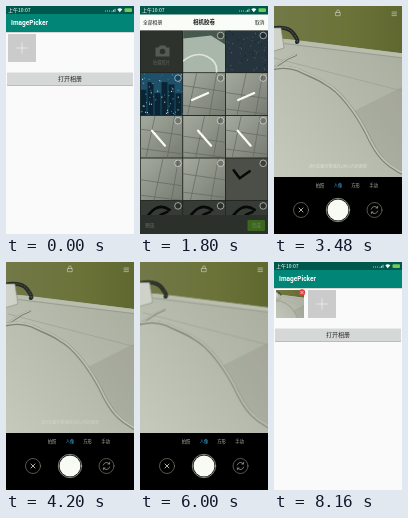
These frames come from a looping animation (128x228 px, 8280 ms). An HTML page:

```html
<!DOCTYPE html>
<html lang="zh">
<head>
<meta charset="utf-8">
<title>ImagePicker</title>
<style>
html, body { margin: 0; width: 100%; height: 100%; overflow: hidden; background: #000; }
#stage { display: block; width: 100vw; height: 100vh; }
text { font-family: "Noto Sans CJK SC", "Noto Sans CJK JP", "Noto Sans CJK", sans-serif; }
.latin { font-family: Roboto, Inter, sans-serif; }
.mid { text-anchor: middle; }
.line { fill: none; stroke-linecap: round; stroke-linejoin: round; }
#shutter { transform-box: fill-box; transform-origin: center; }
</style>
</head>
<body>
<svg id="stage" viewBox="0 0 128 228">
  <defs>
    <linearGradient id="wall" x2="1" y2="0">
      <stop stop-color="#747a4b"/><stop offset=".55" stop-color="#6b7339"/><stop offset="1" stop-color="#5a632c"/>
    </linearGradient>
    <linearGradient id="desk" x1="1" y1="0" x2="0" y2="1">
      <stop stop-color="#a3a798"/><stop offset=".5" stop-color="#b6baac"/><stop offset="1" stop-color="#cbd0c2"/>
    </linearGradient>
    <linearGradient id="tile" x2="1" y2="1">
      <stop stop-color="#a5aa9f"/><stop offset="1" stop-color="#777c72"/>
    </linearGradient>

    <rect id="charge" x="118.5" y="2.3" width="7.5" height="3.8" rx="1" fill="#72c85a"/>
    <g id="status" fill="#fff">
      <text x="2" y="6.3" font-size="5">上午10:07</text>
      <path d="M99 5h1m1 0h1m1 0h1M106 5.8v-1m1.5 1v-2m1.5 2v-3" stroke="#fff" stroke-width=".7" fill="none"/>
      <path d="M111.3 3.2q2.5-2 5 0L113.8 6.2z"/>
      <use href="#charge"/>
    </g>

    <g id="photo">
      <rect x="-20" y="-20" width="170" height="230" fill="url(#desk)"/>
      <path d="M80 105C96 135 100 158 150 175V70z" fill="#50564a" opacity=".12"/>
      <path d="M-20-20H150V50L22 34L-20 30z" fill="url(#wall)"/>
      <path d="M10 33L150 50V54L10 37z" fill="#b9bdae"/>
      <path d="M10 37.5L150 54.5" stroke="#8d9282" stroke-width=".7"/>
      <path d="M0 52L140 88" stroke="#989d8f" stroke-width=".6"/>
      <g class="line">
        <path d="M-4 23Q13 19 19 27T23 36" stroke="#252a25" stroke-width="4"/>
        <path d="M-4 23Q13 19 19 27T23 36" stroke="#596052" stroke-width="1" stroke-dasharray="1 2"/>
        <path d="M-20 22H7L10 42L-20 51z" fill="#cfd2c8" stroke="#858a7d" stroke-width=".6"/>
        <path d="M-8 67L13 53L22 49" stroke="#777e70" stroke-width="2.2"/>
        <path d="M-8 66.5L13 52.5L22 48.5" stroke="#c4c8b9" stroke-width="1.2"/>
        <path d="M-8 64C5 61 14 60 24 64C36 70 44 72 52 78C66 85 82 107 92 126C102 148 111 163 145 174" stroke="#7c8174" stroke-width="3.4"/>
        <path d="M-8 63.3C5 60.3 14 59.3 24 63.3C36 69.3 44 71.3 52 77.3C66 84.3 82 106.3 92 125.3C102 147.3 111 162.3 145 173.3" stroke="#bcc0b1" stroke-width="2"/>
      </g>
    </g>

    <g id="add">
      <rect width="28" height="28" fill="#cbcbcb"/>
      <path d="M14 8.5v11M8.5 14h11" stroke="#eee" stroke-width=".8"/>
    </g>
    <g id="cross"><path class="line" d="M-2-2L2 2M2-2L-2 2" stroke-width=".9"/></g>
  </defs>

  <g id="main">
    <rect width="128" height="228" fill="#fafafa"/>
    <rect y="25" width="128" height="2" fill="#d5d9d8"/>
    <rect width="128" height="26" fill="#008577"/>
    <rect width="128" height="8" fill="#00574b"/>
    <use href="#status"/>
    <text class="latin" x="5" y="19.4" font-size="6.5" font-weight="600" fill="#fff">ImagePicker</text>
    <use id="plus" href="#add" x="2" y="28"/>
    <g id="picked">
      <svg x="2" y="28" width="28" height="28" viewBox="0 12 128 128"><use href="#photo"/></svg>
      <circle cx="28" cy="30.5" r="3.2" fill="#d94040"/>
      <use href="#cross" transform="translate(28 30.5) scale(.65)" stroke="#fff"/>
    </g>
    <rect x="1" y="67" width="126" height="13" rx=".7" fill="#bbb"/>
    <rect id="button" x="1" y="66.5" width="126" height="12.5" rx=".7" fill="#d6d7d7"/>
    <text class="mid" x="64" y="75" font-size="6" fill="#222">打开相册</text>
  </g>

  <g id="gallery">
    <rect width="128" height="228" fill="#20251f"/>
    <rect width="128" height="24.5" fill="#fafcf8"/>
    <rect width="128" height="8.5" fill="#00574b"/>
    <use href="#status"/>
    <g fill="#1c1f1c">
      <text x="3" y="18" font-size="4.8">全部相册</text>
      <text class="mid" x="64" y="18.2" font-size="5.5" font-weight="700">相机胶卷</text>
      <text x="115" y="18" font-size="4.8">取消</text>
    </g>
    <g id="cells"></g>
    <rect y="209" width="128" height="19" fill="#2b312a"/>
    <text x="5" y="220.5" font-size="4.8" fill="#69706c">预览</text>
    <rect x="107.5" y="214" width="17.5" height="11" rx="1.2" fill="#3c661d"/>
    <text class="mid" x="116.3" y="221.3" font-size="4.6" fill="#71856b">完成</text>
  </g>

  <g id="camera">
    <rect width="128" height="228"/>
    <svg width="128" height="171"><use id="live" href="#photo"/></svg>
    <text id="hint" class="mid" x="64" y="161.5" font-size="4" fill="#eef0ec" fill-opacity=".65">请与拍摄对象保持2米以内的距离</text>
    <g id="controls">
      <g class="line" stroke="#d5d9c9" stroke-width=".6">
        <path d="M62.6 6.5V5.4a1.4 1.4 0 0 1 2.8 0v1.1M61.8 6.5h4.4v3.2h-4.4z"/>
        <path d="M118 6h4.5m-4.5 1.8h4.5m-4.5 1.8h4.5"/>
      </g>
      <g class="mid" font-size="4.3" fill="#b4b8ac">
        <text x="46" y="181.2">拍照</text>
        <text id="mode" x="64" y="181.2">人像</text>
        <text x="81.5" y="181.2">方形</text>
        <text x="99.5" y="181.2">手动</text>
      </g>
      <g class="line" stroke="#c2c6b6">
        <circle cx="27" cy="204" r="7.5" stroke="#8c917d" stroke-width=".6"/>
        <use href="#cross" x="27" y="204"/>
        <circle cx="100.5" cy="204" r="7.5" stroke="#8c917d" stroke-width=".6"/>
        <path d="M97.3 203a3.4 3.4 0 0 1 6-1.2M103.7 205a3.4 3.4 0 0 1-6 1.2M101.9 202h1.7v-1.7M99.1 206h-1.7v1.7" stroke-width=".6"/>
        <circle cx="64" cy="204" r="11.7" stroke-width=".7"/>
      </g>
      <circle id="shutter" cx="64" cy="204" r="10.5" fill="#f8faf4"/>
    </g>
    <use id="battery" href="#charge"/>
  </g>

  <g id="preview">
    <rect width="128" height="228"/>
    <svg width="128" height="171"><use href="#photo" x="2" y="-2"/></svg>
    <g id="mark" class="latin" font-size="3.2" fill="#fff">
      <circle cx="8" cy="161.5" r="2.6"/>
      <text class="latin" x="20" y="161">SHOT ON PELUNA K5</text>
      <text class="latin" x="20" y="165">AI DUAL CAMERA</text>
    </g>
    <g class="line" stroke="#e8ebdd">
      <g stroke="#77823f" stroke-width=".8">
        <circle cx="27" cy="200" r="7.7"/>
        <circle id="confirm" cx="101.5" cy="200" r="7.7"/>
      </g>
      <use href="#cross" x="27" y="200"/>
      <path d="M98.5 200l2.2 2.3 4-4.5" stroke-width="1"/>
    </g>
  </g>
</svg>

<script>
const $ = id => document.getElementById(id);
const STEP = 120, COUNT = 69;

let seed = 7;
const rand = () => (seed = seed * 16807 % 2147483647) / 2147483647;
const rect = (x, y, w, h, fill) => `<rect x="${x}" y="${y}" width="${w}" height="${h}" fill="${fill}"/>`;
const path = (d, color, width) => `<path class="line" d="${d}" stroke="${color}" stroke-width="${width}"/>`;

function dots(n, colors) {
  let out = '';
  for (let i = 0; i < n; i++)
    out += rect(rand() * 42, rand() * 42, 1, 1.2, colors[i % colors.length]);
  return out;
}

const scenes = {
  camera: () => rect(0, 0, 42, 42, '#2d332c') +
    '<path d="M15 17h3l1.3-2h5.4l1.3 2h3v9H15z" fill="#555b54"/><circle cx="22" cy="21" r="2.8" fill="#2d332c"/>' +
    '<text class="mid" x="21" y="33" font-size="4.2" fill="#5f665e">拍摄照片</text>',
  desk: () => rect(0, 0, 42, 42, '#a9b6aa') +
    '<path d="M0 0H42V14L28 5L0 8z" fill="#47594e"/>' +
    path('M-2 32Q12 20 24 26T33 44', '#dfe5dc', 1.6),
  night: () => rect(0, 0, 42, 42, '#26343d') + dots(55, ['#40525d', '#182329', '#4d6470']),
  city: () => {
    let out = rect(0, 0, 42, 42, '#1f5069');
    for (let x = 0; x < 42; x += 7) {
      const top = 5 + rand() * 17;
      out += rect(x, top, 6, 42 - top, '#0b2433');
    }
    return out + dots(60, ['#4b9ab8', '#2d758f', '#bed8d5']);
  },
  floor: i => {
    const shift = i * 7 % 13;
    const bar = i < 6 ? `M${8 + shift / 2} 27l16-7` : `M${10 + shift / 2} 15l13 15`;
    return rect(0, 0, 42, 42, 'url(#tile)') +
      path(`M-3 ${10 + shift}L45 ${17 + shift}M-3 ${31 + shift / 2}L45 ${37 + shift / 2}M${12 + shift} -2L${2 + shift} 44M${33 + shift / 2} -2L${25 + shift / 2} 44`, '#626860', .7) +
      (i < 9 ? path(bar, '#fafaf4', 2.2) : '');
  },
  dark: i => rect(0, 0, 42, 42, i === 11 ? '#4b4f48' : '#363b35') +
    path(i === 11 ? 'M8 12l6 8M14 20l10-7' : 'M8 14q10-13 21-5m-9 5l7-3', '#070909', 2.6)
};

const layout = ['camera', 'desk', 'night', 'city'];
for (let i = 4; i < 15; i++) layout.push(i < 11 ? 'floor' : 'dark');
$('cells').innerHTML = layout.map((kind, i) => {
  const x = .5 + i % 3 * 42.6, y = 24.5 + Math.floor(i / 3) * 42.6;
  const ring = i ? '<circle cx="37.5" cy="5" r="3.3" fill="#0003" stroke="#eee" stroke-width=".6"/>' : '';
  return `<svg x="${x}" y="${y}" width="42" height="42">${scenes[kind](i)}${ring}</svg>`;
}).join('');

// Each key is [step, value]; values advance once per step.
function play(id, prop, keys) {
  if (keys[0][0] > 0) keys.unshift([0, keys[0][1]]);
  keys.push([COUNT, keys[keys.length - 1][1]]);
  const frames = keys.map(([at, value], i) => ({
    offset: at / COUNT,
    [prop]: value,
    easing: i < keys.length - 1 ? `steps(${keys[i + 1][0] - at}, end)` : 'linear'
  }));
  $(id).animate(frames, { duration: STEP * COUNT, iterations: Infinity, delay: -2 });
}
const move = (x, y = 0) => `translate(${x}px, ${y}px)`;
const slide = (id, keys) => play(id, 'transform', keys.map(([at, x, y]) => [at, move(x, y)]));
const enter = at => [[at, 128], [at + 1, 96], [at + 2, 38], [at + 3, 9], [at + 4, 0], [59, 0], [60, 128]];

play('button', 'fill', [[0, '#d6d7d7'], [1, '#c4c5c5'], [4, '#d6d7d7']]);
slide('plus', [[0, 0], [59, 0], [60, 32]]);
play('picked', 'opacity', [[0, 0], [59, 0], [60, 1]]);

slide('gallery', enter(1));
play('cells', 'opacity', [[0, 0], [4, 0], [6, 1]]);

slide('camera', enter(15));
play('controls', 'opacity', [[0, 0], [18, 0], [20, .72], [22, 1]]);
play('battery', 'opacity', [[0, .6], [20, .6], [21, 0]]);
play('live', 'opacity', [[0, 0], [21, 0], [23, 1], [51, 1], [52, 0], [53, 1]]);
slide('live', [[0, 0, 0], [29, 0, 0], [42, 4, 0], [53, 2, -2]]);
play('hint', 'opacity', [[0, 0], [24, 0], [26, 1], [34, 1], [37, 0]]);
play('mode', 'fill', [[0, '#b4b8ac'], [21, '#b4b8ac'], [22, '#35a9e0']]);
play('shutter', 'transform', [[0, 'scale(1)'], [50, 'scale(1)'], [51, 'scale(.84)'], [53, 'scale(1)']]);

play('preview', 'opacity', [[0, 0], [53, 0], [54, 1]]);
slide('preview', [[0, 0], [63, 0], [64, 18], [65, 70], [66, 112], [67, 128]]);
play('mark', 'opacity', [[0, 0], [55, 0], [57, 1]]);
play('confirm', 'fill', [[0, '#000'], [61, '#000'], [62, '#394119'], [64, '#000']]);
</script>
</body>
</html>
```
